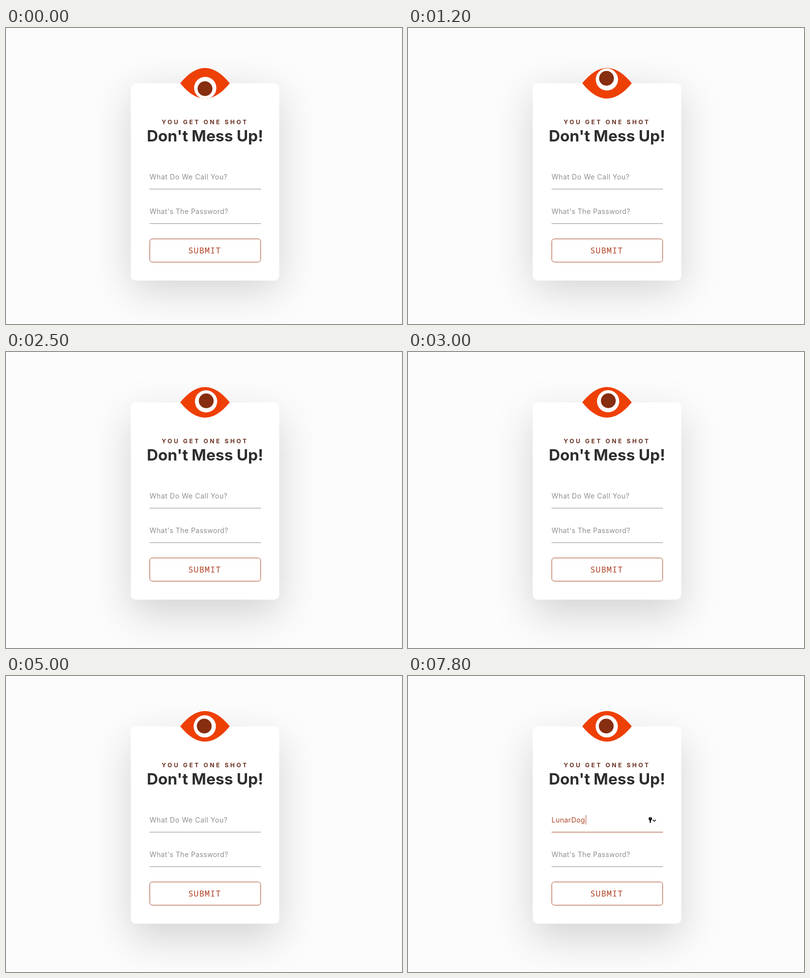
Animation of 800x600 px, one loop 8 s. Source, as an HTML page:

```html
<!DOCTYPE html>
<html lang="en">
<head>
<meta charset="utf-8">
<title>One shot form</title>
<style>
  html, body { margin: 0; width: 100%; height: 100%; overflow: hidden; background: #fcfcfc; }
  svg { display: block; width: 800px; height: 600px; font-family: Inter, "Open Sans", sans-serif; }
  .field { font-size: 14px; letter-spacing: .38px; fill: #8f8f8f; }
  .accent { fill: #b0462a; }
  .rule { stroke: #8f8f8f; stroke-width: 1; }
  #hint { letter-spacing: .53px; }
</style>
</head>
<body>
<svg viewBox="0 0 800 600">
  <defs>
    <filter id="blur" x="-60%" y="-50%" width="220%" height="200%">
      <feGaussianBlur stdDeviation="40"/>
    </filter>
    <path id="lid" d="M352 112Q402 50 452 112Q402 174 352 112Z"/>
    <clipPath id="lidClip"><use href="#lid"/></clipPath>
  </defs>
  <rect width="800" height="600" fill="#fcfcfc"/>
  <rect x="252" y="132" width="300" height="400" rx="10" fill-opacity=".16" filter="url(#blur)"/>
  <g id="card">
    <rect x="252" y="112" width="300" height="400" rx="10" fill="#fff"/>
    <use href="#lid" fill="#ee3f05"/>
    <g clip-path="url(#lidClip)">
      <circle id="iris" r="22.5" fill="#fff"/>
      <circle id="pupil" r="15" fill="#872d10"/>
    </g>
    <text x="314.5" y="195" font-size="12" font-weight="700" letter-spacing="3.53" fill="#6a3122">YOU GET ONE SHOT</text>
    <text x="402" y="230" font-size="31.5" font-weight="700" text-anchor="middle" fill="#2d2e2f">Don't Mess Up!</text>

    <text id="hint" class="field" x="290" y="307">What Do We Call You?</text>
    <text id="entry" class="field accent" x="290" y="307"></text>
    <rect id="caret" class="accent" y="292" width="1" height="19"/>
    <path id="nameRule" class="rule" d="M290 326.5H515"/>
    <g id="key">
      <path d="M488.3 301H491V304L490.4 305L491 306L489.6 308L488.3 307Z"/>
      <circle cx="489.6" cy="299.3" r="3.4"/>
      <circle cx="489.6" cy="297.9" r=".8" fill="#fff"/>
      <path d="M494.5 301.5L497.6 304.5L500.7 301.5" fill="none" stroke="#000" stroke-width="1.5"/>
    </g>

    <text class="field" x="290" y="377">What's The Password?</text>
    <path class="rule" d="M290 396.5H515"/>

    <rect x="290.5" y="427.5" width="224" height="47" rx="5" fill="none" stroke="#a8492b"/>
    <text class="accent" x="368" y="457" font-family="'Noto Sans Mono', 'DejaVu Sans Mono', monospace" font-size="17" letter-spacing=".9">SUBMIT</text>
  </g>
</svg>
<script>
const LOOP = 8000, STEP = 100;
const EYE = { x: 402, y: 112 };
const NAME = "LunarDog";
const FOCUS = 5300, CARET_OFF = 5800;

// time, x, y of the pupil relative to the eye centre
const gaze = [
  [0, 0, 11], [300, 8, 8], [600, 11.5, 0], [900, 7, -8], [1200, -1, -10],
  [1550, -9, -6], [1900, -12, 3], [2200, -5, 1], [2500, 2.5, -3],
  [2800, 3, -3], [3700, .5, -5], [4300, .5, -5], [5000, -1.5, -.5], [5200, -1.5, -.5]
];
// time, typed letters
const typing = [[6400, 1], [6500, 2], [6800, 3], [7100, 4], [7500, 5], [7600, 7], [7800, 8]];

const $ = id => document.getElementById(id);
const clamp = v => Math.min(1, Math.max(0, v));
const ease = v => v * v * (3 - 2 * v);
const progress = (t, start, length) => ease(clamp((t - start) / length));

// Hermite curve through the gaze points, tangents scaled to uneven times
function look(t, axis) {
  const last = gaze.length - 1;
  if (t >= gaze[last][0]) return gaze[last][axis];
  const i = gaze.findIndex((g, n) => n < last && t < gaze[n + 1][0]);
  const a = gaze[i], b = gaze[i + 1], span = b[0] - a[0];
  const slope = n => {
    const p = gaze[Math.max(0, n - 1)], q = gaze[Math.min(last, n + 1)];
    const here = gaze[n];
    const before = here[axis] - p[axis], after = q[axis] - here[axis];
    return before * after <= 0 ? 0 : (q[axis] - p[axis]) / (q[0] - p[0]);
  };
  const u = (t - a[0]) / span, v = 1 - u;
  return a[axis] * v * v * (1 + 2 * u) + b[axis] * u * u * (1 + 2 * v)
    + span * u * v * (slope(i) * v - slope(i + 1) * u);
}

function place(id, x, y) {
  $(id).setAttribute("cx", EYE.x + x);
  $(id).setAttribute("cy", EYE.y + y);
}

function mix(from, to, k) {
  return `rgb(${from.map((c, i) => Math.round(c + (to[i] - c) * k))})`;
}

function show(id, on) {
  $(id).setAttribute("visibility", on ? "visible" : "hidden");
}

function draw(t) {
  const x = look(t, 1), y = look(t, 2);
  place("iris", x * .65 + .5, y * .82 + .5);
  place("pupil", x, y);
  $("card").setAttribute("transform", `translate(0 ${-10 * progress(t, 2100, 300)})`);

  const typed = typing.reduce((n, [time, count]) => t >= time ? count : n, 0);
  $("entry").textContent = NAME.slice(0, typed);
  show("hint", !typed);
  show("key", t >= FOCUS);
  show("caret", typed > 0 || (t >= FOCUS && t < CARET_OFF));
  $("caret").setAttribute("x", Math.round(290 + (typed ? $("entry").getComputedTextLength() + 1 : 0)));
  $("nameRule").style.stroke = mix([143, 143, 143], [168, 73, 43], progress(t, FOCUS - STEP, 400));
}

const begin = performance.now();
function tick() {
  const t = (performance.now() - begin) % LOOP;
  draw(Math.floor(t / STEP) * STEP);
  requestAnimationFrame(tick);
}
tick();
</script>
</body>
</html>
```
